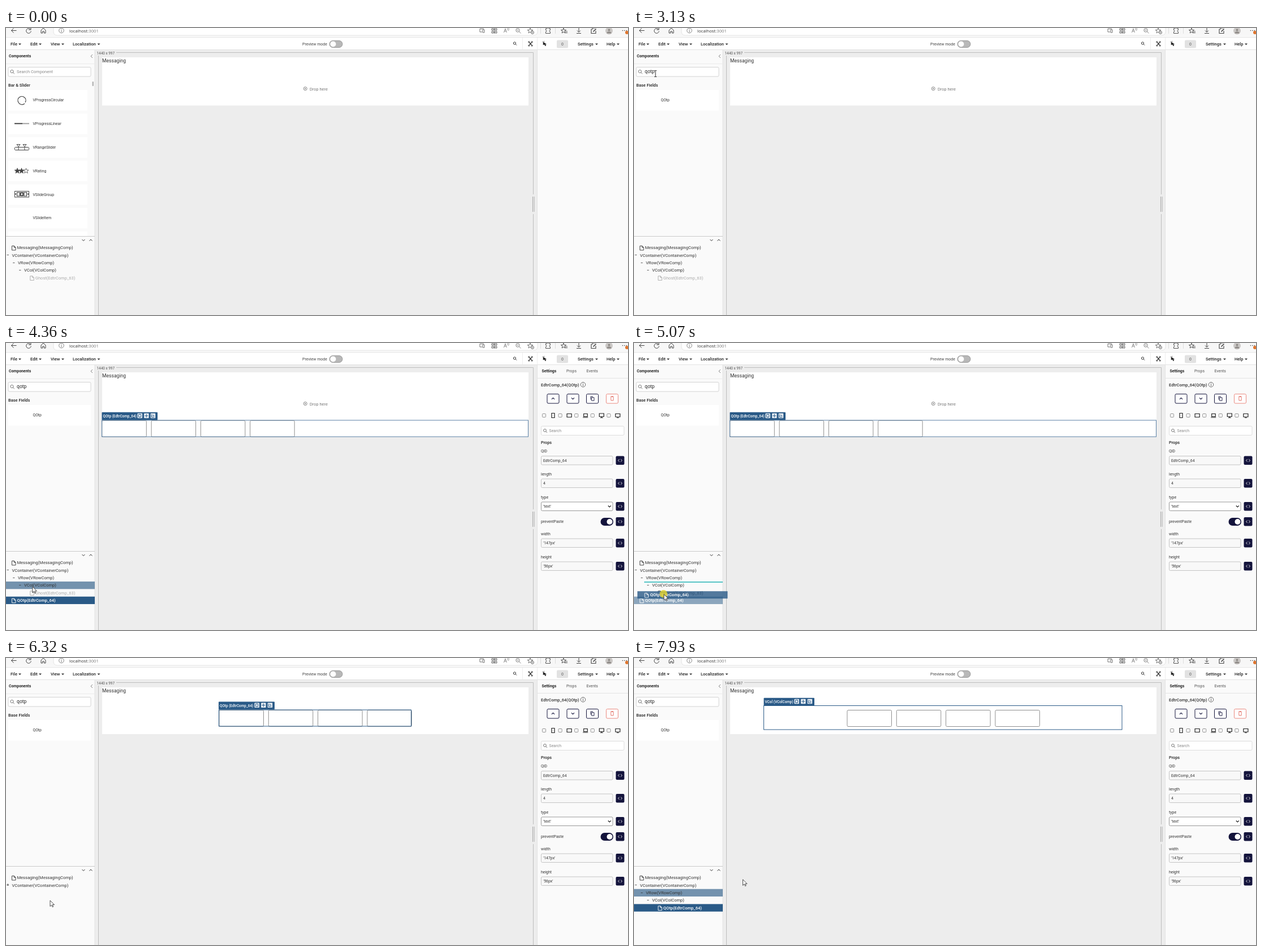
Recreate the animation shown at these times as an HTML page. Size 1100 by 509 pixels, loop 8 s.

```html
<!DOCTYPE html>
<html lang="en">
<head>
<meta charset="utf-8">
<title>Component editor</title>
<style>
  html, body { margin: 0; width: 100%; height: 100%; overflow: hidden; background: #fafafa; }
  svg { display: block; font-family: Roboto, "Noto Sans", sans-serif; }
</style>
</head>
<body>
<svg id="stage" width="1100" height="509" viewBox="0 0 1100 509">
  <g id="base"></g>
  <g id="live"></g>
</svg>
<script>
const LOOP = 8000;
const NAVY = '#14143c', BLUE = '#2a5a87', INK = '#333';

const text = (x, y, str, size = 7.5, fill = INK, weight = 400) =>
  `<text x="${x}" y="${y}" font-size="${size}" fill="${fill}" font-weight="${weight}">${str}</text>`;
const rect = (x, y, w, h, fill, stroke = 'none', r = 0, extra = '') =>
  `<rect x="${x}" y="${y}" width="${w}" height="${h}" rx="${r}" fill="${fill}" stroke="${stroke}" ${extra}/>`;
const line = (d, stroke = INK, width = 1, fill = 'none') =>
  `<path d="${d}" fill="${fill}" stroke="${stroke}" stroke-width="${width}"/>`;
const circle = (x, y, r, fill, stroke = 'none', width = 1) =>
  `<circle cx="${x}" cy="${y}" r="${r}" fill="${fill}" stroke="${stroke}" stroke-width="${width}"/>`;
const at = (x, y, body) => `<g transform="translate(${x} ${y})">${body}</g>`;
const caretDown = (x, y) => `<path d="M${x} ${y}h5l-2.5 2.7z" fill="${INK}"/>`;
const lens = (x, y, r, color = '#555', width = 0.8) =>
  circle(x, y, r, 'none', color, width) + line(`M${x + r * .7} ${y + r * .7}l${r} ${r}`, color, width);

function star(x, y, r, fill, stroke = '#444', width = 0.8) {
  const points = Array.from({ length: 10 }, (_, i) => {
    const a = i * Math.PI / 5, q = i % 2 ? r * .42 : r;
    return `${(x + q * Math.sin(a)).toFixed(1)} ${(y - q * Math.cos(a)).toFixed(1)}`;
  });
  return line(`M${points.join('L')}z`, stroke, width, fill);
}

function browserBar() {
  const dark = '#444';
  return rect(0, 0, 1100, 14, '#f7f7f7') + rect(84, -8, 856, 21, '#fff', '#e4e4e4', 6) +
    line('M18.500 4.500H9.500M13.500 .5l-4 4 4 4', dark) +
    line('M43.500 2.500a4.300 4.300 0 1 0 .8 3M44 -1v4h-4', dark) +
    line('M62 9V4l4-4 4 4v5h-2.700V6h-2.600v3z', dark) +
    circle(98, 4.500, 4.300, 'none', '#666', .8) + line('M98 4v3M98 2v1', '#666', .9) +
    `<text x="112" y="7.800" font-size="7.700" fill="#333" font-family="'Open Sans', sans-serif">localhost<tspan fill="#777">:3001</tspan></text>` +
    line('M838 7V1.500h7M838 7h4M843 3h3v5h-3z', '#666', .9) +
    line('M859 1h3v3h-3zM865 1h3v3h-3zM859 6h3v3h-3zM865 6h3v3h-3zM863.500 0v10', '#555', .9) +
    text(880, 8, 'A', 9, '#666') + line('M886.500 0q1.500 2 0 4M888.500 -1q2 3 0 6', '#777', .7) +
    lens(905, 4, 3.200, '#666') + line('M903.500 4h3', '#666', .8) +
    star(927, 5, 5, 'none', '#555') + circle(931, 8, 2.600, '#fff', '#555', .8) + line('M929.700 8h2.600M931 6.700v2.600', '#555', .6) +
    line('M945.500 0v10M971.500 0v10', '#ddd') +
    line('M954.500 1h2.500a1.500 1.500 0 0 1 3 0h2.500v2.800a1.500 1.500 0 0 0 0 3V9.500h-8V6.800a1.500 1.500 0 0 0 0-3z', dark, .9) +
    star(986, 5, 4.800, 'none', dark, .9) + line('M989 6h4M989 8.500h4', dark, .9) +
    line('M1013 0v7M1010 4.500l3 3 3-3M1009 9.500h8', dark) +
    line('M1035 2h2l1-2h4M1035 2v7.500h8V5', dark, 1.100) + line('M1038.500 6.500l5-5', dark, 1.600) +
    circle(1066.500, 5, 6.500, '#cbc8c6') + circle(1066.500, 3.500, 2, '#8f8b88') +
    line('M1062.500 9.500a4 3.300 0 0 1 8 0z', 'none', 0, '#8f8b88') +
    [1090.500, 1094, 1097.500].map(x => circle(x, 4.500, .8, dark)).join('') + circle(1098, 8, 3, '#e0762f');
}

function menuBar() {
  const menus = [[8, 'File', 22], [43, 'Edit', 58], [79, 'View', 98], [118, 'Localization', 161.500], [1011, 'Settings', 1042], [1062, 'Help', 1080]];
  return rect(0, 16, 1100, 22, '#fff') + line('M0 16.500H1100M0 38.500H1100', '#e3e3e3') +
    menus.map(([x, name, arrow]) => text(x, 31, name, 7.500, '#222', 500) + caretDown(arrow, 27.500)).join('') +
    text(524, 31, 'Preview mode', 7, '#444') +
    rect(572, 22.500, 23, 12, '#b8b8b8', '#999', 6) + circle(578.500, 28.500, 5, '#fff') +
    lens(899.500, 27, 2.100, '#333', 1) + line('M913.500 17v21M939.500 17v21', '#eee') +
    line('M924 26v-2h2M929 24h2v2M931 30v2h-2M926 32h-2v-2', '#333', 1) + line('M925 25l5 6M930 25l-5 6', '#333', 1.200) +
    line('M950 25v5l2-1 2 3 1-1-1.500-2.500h2z', '#222', .5, '#222') + line('M949 24l1 1M951.500 23v1.500', '#222', .8) +
    rect(974, 21.500, 20, 14, '#e2e2e2', 'none', 2) + text(982, 31, '0', 7, '#555');
}

function frameLines() {
  return rect(157, 39, 782.500, 470, '#ededed') + line('M157 39V509M939.500 39V509', '#e2e2e2') +
    text(160.500, 46.500, '1440 x 997', 6.400, '#555') +
    line('M195 43.500H932.500V295M932.500 330V509M163.500 49V509', '#bdbdbd') +
    line('M931.500 299v27M934 299v27', '#aaa');
}

function sidebar() {
  return text(5, 52.300, 'Components', 6.850, '#222', 700) + line('M153 47l-3 3 3 3', '#666', .8) +
    line('M0 63.500H157', '#ececec') + rect(4, 69.500, 146, 16.500, '#fff', '#d3d3d3', 2) + lens(10.500, 77, 2.600) +
    line('M0 369.500H157', '#c9c9c9') + line('M134.500 375l2.500 2.500 2.500-2.500M147.500 377.500l2.500-2.500 2.500 2.500', '#333');
}

document.getElementById('base').innerHTML = browserBar() + menuBar() + frameLines() + sidebar();

const cardIcons = [
  line('M22 132a7 7 0 1 1 12 0', '#444', 1.200) + line('M33 134a7 7 0 0 1-11-2', '#444', 1.200) + '',
  line('M15 169.500h14', '#333', 1.800) + line('M29 169.500h12', '#999', 1.800),
  rect(15.500, 211.500, 25, 5, 'none', '#444', 1) + line('M19 206.500h6l-3 4zM30 206.500h6l-3 4zM22 211v5M33 211v5', '#444'),
  star(20, 253.500, 5, '#444') + star(27.500, 253.500, 5, '#444') + star(35.500, 253.500, 4.700, '#fff'),
  rect(15.500, 289.500, 25, 10.500, '#fff', '#444') + line('M19.500 291.500h4.500v6.500h-4.500zM32 291.500h4.500v6.500h-4.500z', '#444', 1.200) +
    line('M26 292h4v5.500h-4zM17 293.500v2M39 293.500v2', '#222', 1.600),
  ''
];
const fieldIcon = i => rect(15.500, 123.500 + i * 41.800, 25, 9, '#fff', '#444', 1) + line(`M19 ${126 + i * 41.800}v4`, '#444');

function cards(title, names, icon) {
  const scrolls = names.length > 1;
  const body = names.map((name, i) => {
    const y = 110 + i * 41.800;
    return rect(4, y, scrolls ? 140 : 146, 36.500, '#fff') + icon(i) + text(47.500, y + 20.400, name, 6.820);
  }).join('');
  return text(4, 103.500, title, 7.450, '#222', 500) + body +
    (scrolls ? rect(4, 360.500, 140, 8.500, '#fff') + rect(152.500, 95, 2.500, 8, '#b5b5b5', 'none', 1) : '');
}

function componentList(t) {
  if (t < 1900) return cards('Bar &amp; Slider',
    ['VProgressCircular', 'VProgressLinear', 'VRangeSlider', 'VRating', 'VSlideGroup', 'VSlideItem'], i => cardIcons[i]);
  if (t < 2350) return cards('Base Fields',
    ['QAutocomplete', 'QCheckbox', 'QCombobox', 'QDatePicker', 'QFileInput', 'QOtp'], fieldIcon);
  return cards('Base Fields', ['QOtp'], () => '');
}

function searchField(t) {
  const typed = t < 1820 ? '' : t < 2350 ? 'q' : t < 2580 ? 'qo' : 'qotp';
  const caret = t >= 1290 && t < 2580 ? 19.500 + typed.length * 4.900 : 0;
  return (typed ? text(19, 80, typed, 8.600, '#222') : text(19, 80.300, 'Search Component', 7.500, '#888')) +
    (caret ? line(`M${caret} 72v11`, '#222', .9) : '');
}

const codeButton = y => rect(1078.500, y, 15, 15.500, NAVY, 'none', 2) +
  line(`M1084.800 ${y + 5.500}l-2.300 2.300 2.300 2.300M1087.200 ${y + 5.500}l2.300 2.300-2.300 2.300`, '#fff', .9);

function settingsPanel() {
  const fields = [['QID', 'EdtrComp_64', 200.500], ['length', '4', 241], ['type', "'text'", 282], ['width', "'147px'", 347], ['height', "'56px'", 388]];
  const button = (x, icon, color = NAVY) => rect(x, 90.500, 21, 16.500, '#fff', color, 2) + at(x + 10.500, 98.500, icon);
  const screens = ['M-2.500-4h5v8h-5z', 'M-4-3h8v6h-8z', 'M-3-3h6.500v5h-6.500zM-4.500 3.500h9', 'M-4-3.500h8v5.500h-8zM0 2v2M-2.500 4h5', 'M-4-3h8v5.500h-8zM-2 4h4'];
  return text(947.500, 52.300, 'Settings', 6.900, '#222', 700) + text(991, 52.300, 'Props', 6.900, '#555') + text(1026.500, 52.300, 'Events', 6.900, '#555') +
    line('M940 62.500H1100', '#e4e4e4') +
    text(946, 76.700, 'EdtrComp_64(QOtp)', 7.500, INK, 500) + circle(1020.500, 73.800, 4.200, 'none', '#444', .8) + line('M1020.500 73v3.200M1020.500 71v1', '#444', .9) +
    button(957, line('M-2.500 1.300l2.500-2.500 2.500 2.500', NAVY, 1.100)) + button(992, line('M-2.500-1.300l2.500 2.500 2.500-2.500', NAVY, 1.100)) +
    button(1026.500, line('M-3 2v-5.500h4M-1.300-1.800h4.300v5.500h-4.300z', NAVY, .9)) +
    button(1061.500, line('M-3-3h6M-1-4h2M-2.300-2l.3 5.500h4l.3-5.500', '#e0675c', .9), '#ea8a80') +
    screens.map((d, i) => rect(948.500 + i * 28.600, 125.500, 6, 6, '#fff', '#777', 1, 'stroke-width=".8"') + at(967.500 + i * 28.600, 128.500, line(d, '#222', 1.200))).join('') +
    rect(946.500, 147.500, 146.500, 16, '#fff', '#ddd', 2) + lens(953, 155, 2.400) + text(960.500, 158, 'Search', 7, '#888') +
    text(946, 178.500, 'Props', 7.300, '#222', 500) +
    fields.map(([name, value, y]) => text(946, y - 6.300, name, 6.900) + rect(946.500, y, 126.500, 15.500, name === 'type' ? '#fff' : '#f8f8f8', name === 'type' ? '#999' : '#c4c4c4', 2) +
      text(950, y + 10.300, value, 6.900) + codeButton(y)).join('') +
    line('M1064.800 288.500l2.500 2.500 2.500-2.500', '#222', 1.200) +
    text(946, 318.700, 'preventPaste', 6.850) + rect(1051.500, 310, 22.500, 14, NAVY, 'none', 7) + circle(1067.500, 317, 5, '#fff') + codeButton(309);
}

function badge(x, y, width, label, iconX) {
  const icons = ['M-2-2.500h4v5h-4z', 'M-3 0h6M0-3v6', 'M-2.500-2.500v5h5M0-2v2h2.500'];
  return rect(x, y, width, 14, BLUE, 'none', 1) + text(x + 2, y + 9.200, label, 6.400, '#fff', 500) +
    icons.map((d, i) => rect(iconX + i * 11.600, y + 2, 8.500, 8.500, '#e9eff5', 'none', 1) + at(iconX + 4.200 + i * 11.600, y + 6.200, line(d, BLUE, 1))).join('');
}

const otpInputs = (x, y) => [0, 1, 2, 3].map(i => rect(x + i * 87.300, y, 78.500, 29, '#fff', '#8f8f8f', 2)).join('');

function canvas(t) {
  const added = t >= 3590, placed = t >= 6230;
  let out = rect(170, 52, 754, placed ? 83 : added ? 114.500 : 85.500, '#fff') + text(170, 61.300, 'Messaging', 8.580, '#333');
  if (!placed) out += circle(529.300, 107.500, 3, 'none', '#666', .8) + circle(529.300, 107.500, 1, '#666') + text(537, 110.500, 'Drop here', 7.400, '#777');
  if (placed) {
    out += otpInputs(377, 92.500);
    if (t < 7300) out += rect(376.500, 92, 340, 29, 'none', BLUE) + badge(376, 77.500, 99, 'QOtp (EdtrComp_64)', 439.500);
    if (t >= 7450) out += rect(229.500, 84.500, 633.500, 42.500, 'none', BLUE) + badge(229.500, 70.800, 89.500, 'VCol (VColComp)', 283.500);
  } else if (added) {
    out += otpInputs(169.800, 137.500) + rect(169.500, 137, 754, 29.200, 'none', '#5a80a6') + badge(169.500, 122.800, 98.500, 'QOtp (EdtrComp_64)', 232.500);
  }
  return out;
}

const rowY = i => 389.500 + i * 13.350;
const bar = (i, fill, opacity = 1, x = 0) => rect(x, rowY(i) - 6.500, 157 - x, 13.300, fill, 'none', 0, `opacity="${opacity}"`);
const page = (x, y, color) => line(`M${x} ${y - 3.500}h4l2.500 2.500v5h-6.500zM${x + 3.800} ${y - 3.500}v2.800h2.700`, color, .9);

function tree(t, cursor) {
  const added = t >= 3590, collapsed = t >= 6230 && t < 6380, placed = t >= 6380;
  const dragging = t >= 4900 && t < 5900;
  const rows = [['Messaging(MessagingComp)', 19.500, 'page'], ['VContainer(VContainerComp)', 10.500, collapsed ? '+' : '−']];
  if (!collapsed) {
    rows.push(['VRow(VRowComp)', 21, '−'], ['VCol(VColComp)', 32, '−']);
    rows.push([placed ? 'QOtp(EdtrComp_64)' : 'Ghost(EdtrComp_63)', 51.800, 'page']);
    if (added && !placed) rows.push(['QOtp(EdtrComp_64)', 19.500, 'page']);
  }
  const selected = collapsed || !added ? -1 : placed ? 4 : 5;
  let hovered = cursor && cursor.x < 157 && cursor.y > 383 ? Math.round((cursor.y - 389.500) / 13.350) : -1;
  if (t >= 4590 && t < 6380) hovered = -1;
  if (t >= 7780) hovered = 2;

  let out = '';
  if (hovered >= 0 && hovered < rows.length && hovered !== selected) out += bar(hovered, '#7392ae');
  if (selected >= 0) out += bar(selected, BLUE, t >= 4900 && t < 6230 ? .52 : 1, t >= 6380 && t < 6530 ? 29 : 0);
  rows.forEach(([name, x, mark], i) => {
    const muted = name.startsWith('Ghost') && !dragging;
    const color = i === selected ? '#fff' : muted ? '#aaa' : INK;
    out += mark === 'page' ? page(x - 9, rowY(i) + .5, color) : text(x - 9.500, rowY(i) + 2.300, mark, 8, INK, 500);
    out += text(x, rowY(i) + 2.700, name, 7.550, color, i === selected ? 500 : 400);
  });
  if (dragging) {
    const x = Math.max(0, cursor.x - 47), y = cursor.y - 5.500;
    if (t >= 5060) out += line('M18 424H157', '#1fb3b5', 1.300);
    out += `<g opacity=".8">${rect(x, y, 159.500, 13, BLUE)}${page(x + 13, y + 7, '#fff')}${text(x + 22.500, y + 9.200, 'QOtp(EdtrComp_64)', 7.550, '#fff', 500)}</g>`;
  }
  return out;
}

// Pointer moves in bursts: start, end, number of steps.
const bursts = [[150, 910, 11], [980, 1360, 6], [3130, 3740, 9], [3910, 4590, 10], [4900, 5460, 8], [7230, 7300, 2], [7450, 7630, 3], [7780, 7930, 3]];
const pointerPath = [[150, 917, 330], [400, 330, 440], [530, 110, 453], [680, 70, 415], [910, 35, 93], [980, 35, 92], [1290, 38, 81],
  [3130, 38, 81], [3440, 54, 126], [3740, 56, 127], [3910, 55, 135], [4360, 47, 432], [4590, 43, 452], [4900, 43, 452],
  [5460, 78, 430], [7230, 78, 430], [7630, 84, 427], [7780, 110, 418], [7930, 192.500, 392.800]];

function pointerAt(t) {
  if (t < 150) return null;
  const [from, to, steps] = bursts.filter(b => b[0] <= t).pop();
  const gap = (to - from) / (steps - 1);
  const time = Math.min(to, from + Math.floor((t - from) / gap + .1) * gap);
  const next = pointerPath.findIndex(p => p[0] >= time);
  const b = pointerPath[next < 0 ? pointerPath.length - 1 : next], a = pointerPath[Math.max(0, next - 1)];
  const k = b[0] > a[0] ? (time - a[0]) / (b[0] - a[0]) : 1;
  return { x: a[1] + (b[1] - a[1]) * k, y: a[2] + (b[2] - a[2]) * k };
}

function pointer(t, cursor) {
  if (!cursor || (t >= 1820 && t < 3130)) return '';
  const pressed = (t >= 1210 && t < 1290) || (t >= 3440 && t < 3600) || (t >= 4900 && t < 5900);
  const beam = t < 3740 && cursor.y > 68 && cursor.y < 87;
  const shape = beam ? line('M-2-5.500h1.500l.5.5.5-.5h1.500M0-5v10M-2 5.500h1.500l.5-.5.5.5h1.500', '#111', .9)
    : line('M0 0v10.500l2.500-2.300 1.700 3.500 1.500-.7-1.600-3.400h3.400z', '#222', .8, '#fff');
  return (pressed ? `<g opacity=".8">${circle(cursor.x - .8, cursor.y - .8, 6.800, '#e3d32c')}</g>` : '') + at(cursor.x, cursor.y, shape);
}

const live = document.getElementById('live');
let shown = '';

function render(t) {
  const cursor = pointerAt(t);
  const picture = canvas(t) + searchField(t) + componentList(t) + (t >= 3590 ? settingsPanel() : '') + tree(t, cursor) + pointer(t, cursor);
  if (picture !== shown) live.innerHTML = shown = picture;
}

const start = performance.now();
function tick() {
  render((performance.now() - start) % LOOP);
  requestAnimationFrame(tick);
}
tick();
</script>
</body>
</html>
```
